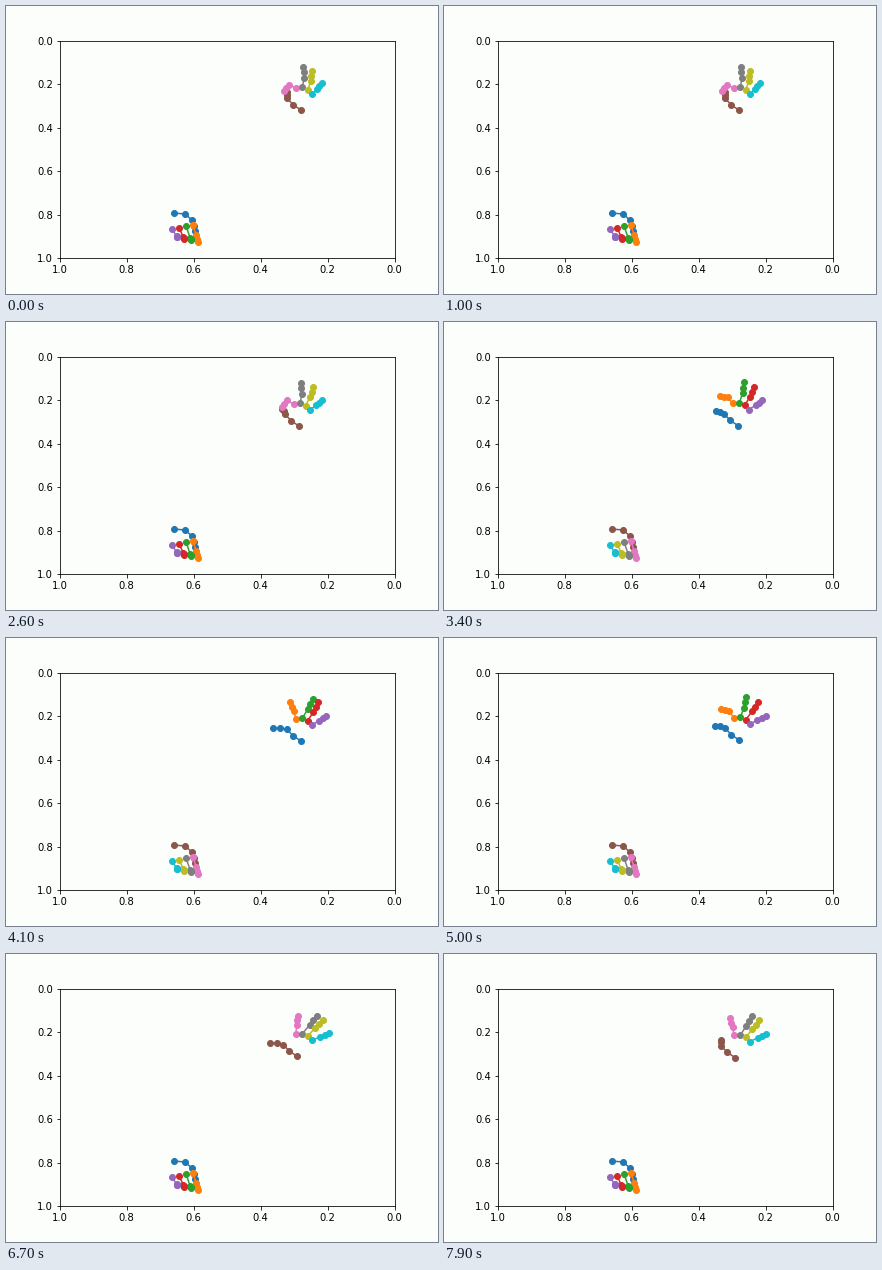
Animation, 432 px wide and 288 px high, one loop 8000 ms. Source, as a matplotlib script:

```python
import numpy as np
import matplotlib.pyplot as plt
from matplotlib.animation import FuncAnimation
from matplotlib.transforms import Affine2D

FRAMES, STEP = 80, 100
PAPER = "#fcfefc"
W, H = 432, 288
LEFT, RIGHT, BOTTOM, TOP = 0.125, 0.9, 0.125, 0.88

# knuckle x, y, rest angle, swing, rest length, stretch, bend
INDEX = -6.6, 0.4, -105, 112, 12.2, 6.5, 5
MIDDLE = 0, 0, 2, 38, 20.5, 2.9, 1.5
RING = 5.4, 2.3, 12, 32, 19.5, 3, 1.5
PINKY = 9.4, 6.5, 42, 28, 15, 4, 1


def bump(t, center, width):
    return np.exp(-((t - center) / width) ** 2)


def finger(root, reach, split=0.48, bend=0):
    """Knuckle, two joints and tip."""
    root, reach = np.array(root), np.array(reach)
    dx, dy = reach
    side = np.array([-dy, dx]) / np.hypot(dx, dy)
    joint, tip = root + split * reach + bend * side, root + reach
    return [root, joint, (joint + tip) / 2, tip]


def swinging(spec, palm, amount):
    x, y, rest, swing, length, stretch, bend = spec
    a = np.radians(rest + swing * amount)
    reach = (length + stretch * amount) * np.array([np.sin(a), -np.cos(a)])
    return finger(palm + (x, y), reach, bend=bend * (1 - amount))


def thumb(wrist, out):
    base, knuckle = wrist + (-8, -5.3), wrist + (-14, -11.8)
    tip = knuckle + (-14 * out, -6 + 5 * out)
    return [wrist, base, knuckle, (knuckle + tip) / 2 + (0, -0.7), tip]


def upper_hand(t):
    palm = np.array([296.3 - 2.2 * bump(t, 2600, 900),
                     81.5 - 2.5 * bump(t, 5700, 1700)])
    wrist = palm + (-1 - np.interp(t, [5000, 6500], [0, 4]), 22.7)
    fan = np.interp(t, [1000, 6400, 8000], [0, 1, 0.8])
    uncurl = np.interp(t, [2700, 4100, 5000, 6700, 8000],
                       [0, 0.78, 0.46, 1, 0.82])
    out = np.interp(t, [1000, 2600, 4100, 5000, 6700, 7900],
                    [0, 0.2, 1, 0.7, 0.95, 0])
    return [thumb(wrist, out),
            swinging(INDEX, palm, uncurl),
            swinging(MIDDLE, palm, uncurl ** 1.4),
            swinging(RING, palm, fan),
            swinging(PINKY, palm, fan)]


def lower_hand():
    # a resting fist: fingers fold shorter toward the pinky
    arc = [(167.7, 207), (179, 208), (186, 214), (188, 220), (188.7, 225)]
    return [arc] + [finger((187 - 7 * i, 218.5 + 1.5 * i),
                           (5, 17.5 - 3.2 * i), 1 - 0.38 / (1 + i))
                    for i in range(4)]


def to_data(points):
    x, y = np.array(points).T
    u = (RIGHT * W - x) / ((RIGHT - LEFT) * W)
    v = (y - (1 - TOP) * H) / ((TOP - BOTTOM) * H)
    return u, v


fig, ax = plt.subplots(figsize=(W / 72, H / 72), dpi=72, facecolor=PAPER)
fig.subplots_adjust(left=LEFT, right=RIGHT, bottom=BOTTOM, top=TOP)
ax.set_facecolor(PAPER)
ax.set(xlim=(1, 0), ylim=(1, 0))
for label in ax.get_xticklabels():
    # whole-pixel placement rounds down
    label.set_transform(label.get_transform() + Affine2D().translate(-0.5, 0))
lines = [ax.plot([], [], "o-", color=f"C{i}", lw=1.5, ms=6)[0]
         for i in range(10)]


def draw(i):
    t = i * STEP
    hands = [lower_hand(), upper_hand(t)]
    # detection order flips for a while
    if 3200 <= t < 5800:
        hands.reverse()
    for line, part in zip(lines, hands[0] + hands[1]):
        line.set_data(*to_data(part))
    return lines


anim = FuncAnimation(fig, draw, frames=FRAMES, interval=STEP,
                     init_func=lambda: draw(0), repeat=True, repeat_delay=0)
plt.show()
```
